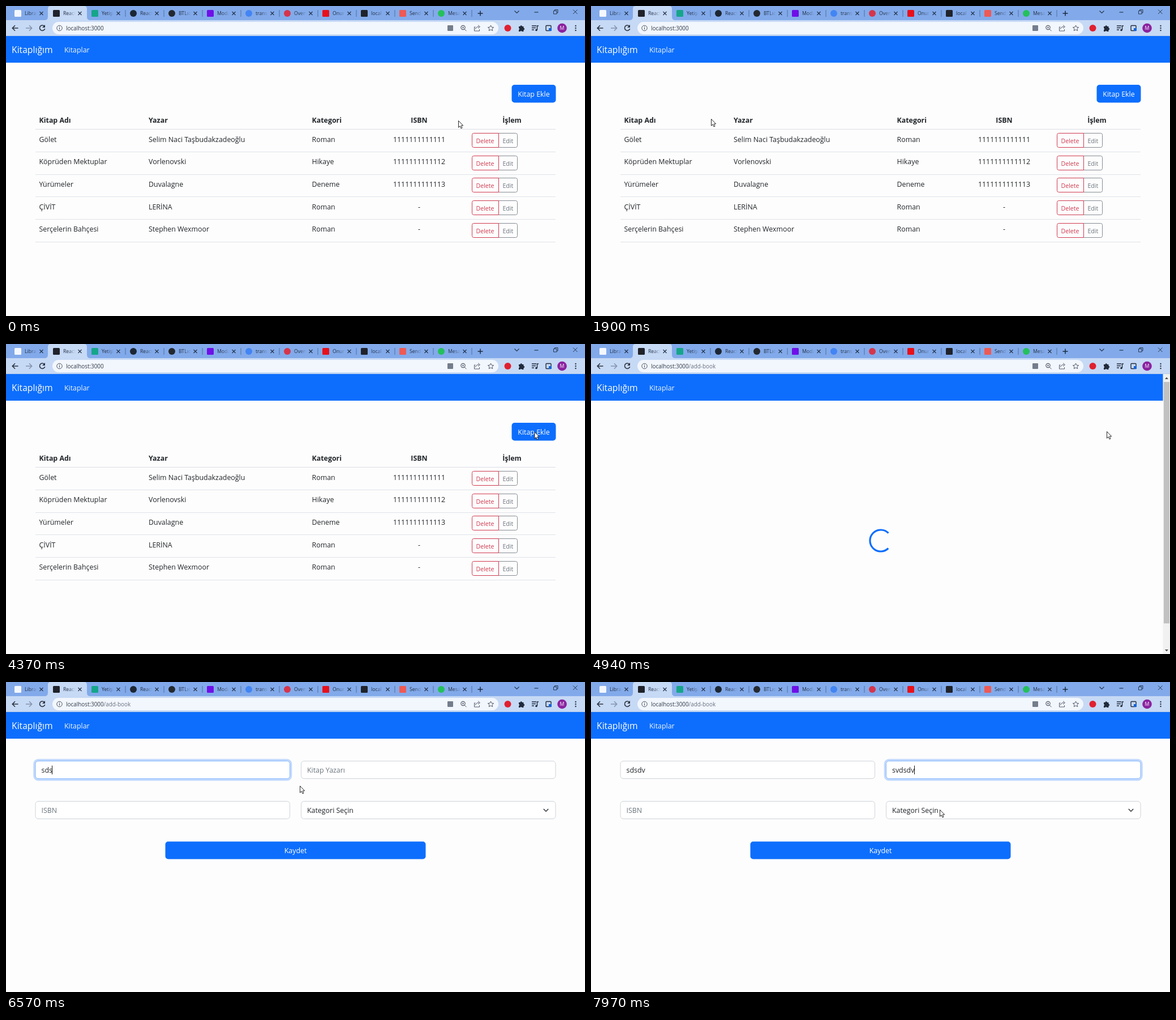
Recreate the animation shown at these times as an HTML page. Size 1023x547 px, loop 8000 ms.

```html
<!DOCTYPE html>
<html lang="tr">
<head>
<meta charset="utf-8">
<title>Kitaplığım</title>
<style>
html, body { margin: 0; width: 100%; height: 100%; overflow: hidden; background: #fdfdfd; }
svg { display: block; width: 100vw; height: 100vh; font: 12.4px "Open Sans", "Noto Sans", sans-serif; }
</style>
</head>
<body>
<svg id="stage" viewBox="0 0 1023 547" preserveAspectRatio="none"></svg>
<script>
const LOOP = 8000, BLUE = '#0d6efd', INK = '#212529', GREY = '#6c757d';

const rect = (x, y, w, h, fill, more = '') =>
  `<rect x="${x}" y="${y}" width="${w}" height="${h}" fill="${fill}" ${more}/>`;
const circle = (x, y, r, fill, more = '') =>
  `<circle cx="${x}" cy="${y}" r="${r}" fill="${fill}" ${more}/>`;
const line = (d, stroke = '#26364f', w = 1.2, more = '') =>
  `<path d="${d}" fill="none" stroke="${stroke}" stroke-width="${w}" ${more}/>`;
const text = (x, y, s, fill = INK, more = '') =>
  `<text x="${x}" y="${y}" fill="${fill}" ${more}>${s}</text>`;
const group = (id, inner) => `<g id="${id}">${inner}</g>`;
const MID = 'text-anchor="middle"';

function browser() {
  const tabs = [
    ['Libra', '#f4f7ff', 0], ['React', '#20232a', 0], ['Yetişi', '#16a58a', 0],
    ['React', '#1d2733', 1], ['BTLıo', '#24292f', 1], ['Modal', '#6f10e8', 0],
    ['trans', '#4285f4', 1], ['Overv', '#d5354c', 1], ['Onur', '#e8101c', 0],
    ['local', '#20232a', 0], ['Send', '#ee5a55', 0], ['Mesaj', '#25c05c', 1]
  ];
  let s = rect(0, 0, 1023, 53, '#82aaea') + rect(0, 25, 1023, 28, '#c6d9f5') +
    '<path d="M68 25q6 0 6-6V5q0-5 5-5H138q5 0 5 5V19q0 6 6 6z" fill="#c6d9f5"/>';
  tabs.forEach(([name, color, round], i) => {
    const icon = round ? circle(21, 13, 6, color) : rect(15, 7, 12, 12, color, 'rx="1.5"');
    s += `<g transform="translate(${68 * i})">${icon}` +
      text(33, 16, name, 'url(#fade)', 'font-size="8.7"') +
      line('M59.5 10l6 6m0-6l-6 6', '#25344c') +
      (i > 1 ? line('M75 7V19', '#4f6f9f', 1) : '') + '</g>';
  });
  s += line('M833.5 13h9M838 8.5v9', '#1d2b42', 1.5) +
    line('M898.5 8.5l4 4 4-4', '#26364f') + line('M933.5 11h7') +
    line('M967.5 8.5h5.500v5.500h-5.500zM969.500 8.500v-2h5.500v5.500h-2', '#26364f', 1) +
    line('M1002 6.500l7.500 7.500m0-7.500l-7.500 7.500', '#26364f', 1);

  s += line('M21.500 39H11.500M16 34.300L11.300 39l4.700 4.700', '#2b333f', 1.6) +
    line('M35 39H45.500M41 34.300l4.700 4.700-4.700 4.700', '#8393ad', 1.5) +
    line('M67.700 35.600A4.700 4.700 0 1 0 68.700 40', '#2b333f', 1.6) +
    '<path d="M69 33v5h-5z" fill="#2b333f"/>' +
    rect(82, 28, 788, 22, '#f2f6fd', 'rx="11"') +
    circle(94.500, 39, 4.700, 'none', 'stroke="#4c5563"') +
    line('M94.500 38.300v3.200M94.500 36v1.200', '#4c5563', 1.1) +
    '<text y="42.500" x="106" font-size="9.900" fill="#333c48">localhost:3000<tspan id="path" fill="#697280"></tspan></text>';

  const g = '#515a68';
  s += rect(780, 34, 10, 10, '#747d8b', 'rx="1"') +
    circle(807.500, 38, 3.600, 'none', `stroke="${g}" stroke-width="1.200"`) +
    line('M810 40.700l3.500 3.500M806 38h3M807.500 36.500v3', g, 1) +
    line('M829.500 37H827.500v7h9v-3M829.500 41q.5-4.500 6-4.500M834 33.800l3.500 2.800-3.500 2.800', g, 1) +
    line('M856.500 34l1.500 3.300 3.600.4-2.700 2.400.8 3.500-3.200-1.800-3.200 1.800.8-3.500-2.700-2.400 3.600-.4z', g, 1) +
    circle(886.500, 39, 6, '#e0202f') +
    '<path d="M906 36h2.500a1.700 1.700 0 1 1 3.400 0h2.600v2.800a1.700 1.700 0 1 1 0 3.400V45H911.500a1.600 1.600 0 0 0-3 0H906v-3a1.600 1.600 0 0 0 0-3z" fill="#202a3a"/>' +
    line('M929 35h8M929 38.500h7M929 42h4M938.500 42V35H941', '#202a3a', 1.4) +
    circle(937, 42.500, 1.800, '#202a3a') +
    rect(954, 34.500, 9, 9, 'none', 'rx="1" stroke="#202a3a" stroke-width="1.400"') +
    rect(959, 39, 5, 5, '#1764d8') +
    circle(982.500, 39, 8.300, '#8b229f') +
    text(982.500, 42.300, 'M', '#fff', `${MID} font-size="8.700"`);
  for (const y of [35, 39, 43]) s += circle(1006.500, y, 1.200, '#27313f');
  return s + rect(0, 52.500, 1023, .8, '#a9bfdd');
}

function list() {
  const books = [
    ['Gölet', 'Selim Naci Taşbudakzadeoğlu', 'Roman', '1111111111111'],
    ['Köprüden Mektuplar', 'Vorlenovski', 'Hikaye', '1111111111112'],
    ['Yürümeler', 'Duvalagne', 'Deneme', '1111111111113'],
    ['ÇİVİT', 'LERİNA', 'Roman', '-'],
    ['Serçelerin Bahçesi', 'Stephen Wexmoor', 'Roman', '-']
  ];
  const row = (y, [a, b, c, d], more = '') =>
    text(58.500, y, a, INK, more) + text(252, y, b, INK, more) +
    text(540.500, y, c, INK, more) + text(730, y, d, INK, MID + more);
  const bold = ' font-weight="700"';
  let s = rect(893.500, 139, 78, 31.500, BLUE, 'rx="5"') +
    text(932.500, 159.600, 'Kitap Ekle', '#fff', MID) +
    row(206, ['Kitap Adı', 'Yazar', 'Kategori', 'ISBN'], bold) +
    text(894, 206, 'İşlem', INK, MID + bold) + rect(52, 217, 919, 1, '#d9dde6');
  books.forEach((book, i) => {
    const y = 39.700 * i, top = Math.round(225 + y) - .5;
    s += row(239.600 + y, book) + rect(52, Math.round(257 + y), 919, 1, '#dfe2e8') +
      line(`M870.500 ${top}h30q3 0 3 3v19q0 3-3 3h-30`, '#858c93', 1) +
      line(`M870.500 ${top}h-44q-3 0-3 3v19q0 3 3 3h44z`, '#cf3a50', 1) +
      text(846.500, top + 17, 'Delete', '#cf3a50', MID + ' font-size="10.600"') +
      text(886.800, top + 17, 'Edit', GREY, MID + ' font-size="10.600"');
  });
  return s;
}

const loader = () =>
  rect(1010.500, 53, 12.500, 494, '#f1f1f1') + rect(1012, 67, 10, 426, '#c1c1c1') +
  '<path d="M1014 62l3-3.500 3 3.500zM1014 539l3 3.500 3-3.500z" fill="#505050"/>' +
  line('M525.400 333.600A19 19 0 1 0 525.400 360.400', BLUE, 3.200, 'id="spinner"');

function form() {
  const field = (x, y) => rect(x, y, 449.500, 31, '#fff', 'rx="5" stroke="#ced4da"');
  return field(52, 139.500) + field(521.500, 139.500) + field(52, 210.500) + field(521.500, 210.500) +
    group('focus',
      rect(-2.100, 137.400, 453.700, 35.200, 'none', `rx="7" stroke="${BLUE}" stroke-opacity=".25" stroke-width="3.300"`) +
      rect(0, 139.500, 449.500, 31, '#fff', 'rx="5" stroke="#86b7fe"')) +
    text(62.500, 159.600, '', INK, 'id="title"') + text(532, 159.600, '', INK, 'id="author"') +
    rect(0, 147.500, 1, 15.500, '#111', 'id="caret"') +
    text(62.500, 230.800, 'ISBN', GREY) + text(532, 230.800, 'Kategori Seçin') +
    line('M949.800 224l4.200 4.200 4.200-4.200', '#343a40', 1.600) +
    rect(281.500, 281.500, 460, 31, BLUE, 'rx="5"') + text(511.500, 301.600, 'Kaydet', '#fff', MID);
}

const $ = id => document.getElementById(id);
$('stage').innerHTML =
  '<defs><linearGradient id="fade" gradientUnits="userSpaceOnUse" x1="42" x2="55" y1="0" y2="0">' +
  '<stop stop-color="#1f2c42"/><stop offset="1" stop-color="#1f2c42" stop-opacity="0"/></linearGradient></defs>' +
  rect(0, 0, 1023, 547, '#fdfdfd') + browser() + rect(0, 53, 1023, 47, BLUE) +
  text(10, 82.500, 'Kitaplığım', '#fff', 'font-size="15.700"') + text(103, 81.600, 'Kitaplar', '#f0f5ff') +
  group('list', list()) + group('loader', loader()) + group('form', form()) +
  '<path id="pointer" d="M.5.500V12.300L3.200 9.800 5 14 7 13.100 5.200 9H8.700z" fill="#fff" stroke="#111" stroke-width=".9"/>';

// pointer stops: time, x, y
const stops = [
  [0, 799, 202], [120, 799, 202], [1070, 566, 142], [1900, 212, 199], [2350, 235, 215],
  [3200, 939, 155], [4200, 939, 155], [4800, 911, 154], [5200, 911, 154], [5750, 330, 152],
  [6050, 330, 152], [6570, 519, 183], [6950, 590, 150], [7400, 590, 150], [7850, 616, 225], [LOOP, 616, 225]
];
function pointerAt(t) {
  const i = stops.findIndex(s => s[0] > t);
  const [t0, x0, y0] = stops[i - 1], [t1, x1, y1] = stops[i];
  const u = (t - t0) / (t1 - t0), k = u * u * (3 - 2 * u);
  return [x0 + (x1 - x0) * k, y0 + (y1 - y0) * k];
}

const OPEN = 4920, READY = 5250, FOCUS = 5850, NEXT = 7000;
const show = (id, on) => $(id).setAttribute('display', on ? 'inline' : 'none');
const typed = (s, times, t) => s.slice(0, times.filter(k => k <= t).length);

function fill(id, value, hint) {
  $(id).textContent = value || hint;
  $(id).setAttribute('fill', value ? INK : GREY);
}

function draw(t) {
  show('list', t < OPEN);
  show('loader', t >= OPEN && t < READY);
  show('form', t >= READY);
  $('path').textContent = t < OPEN ? '' : '/add-book';
  $('spinner').setAttribute('transform', `rotate(${Math.max(0, t - 4940) * 360 / 750} 512 347)`);

  const title = typed('sdsdv', [6200, 6350, 6500, 6680, 6780], t);
  const author = typed('svdsdv', [7180, 7260, 7350, 7430, 7520, 7600], t);
  fill('title', title, 'Kitap Adı');
  fill('author', author, 'Kitap Yazarı');
  const right = t >= NEXT, value = right ? author : title;
  show('focus', t >= FOCUS);
  show('caret', t >= FOCUS);
  $('focus').setAttribute('transform', `translate(${right ? 521.500 : 52})`);
  const width = value && t >= READY ? $(right ? 'author' : 'title').getComputedTextLength() : 0;
  $('caret').setAttribute('x', Math.round((right ? 532 : 62.500) + width - .5));

  const [x, y] = pointerAt(t);
  $('pointer').setAttribute('transform', `translate(${x} ${y})`);
}

const start = performance.now();
function tick() {
  draw((performance.now() - start) % LOOP);
  requestAnimationFrame(tick);
}
tick();
</script>
</body>
</html>
```
